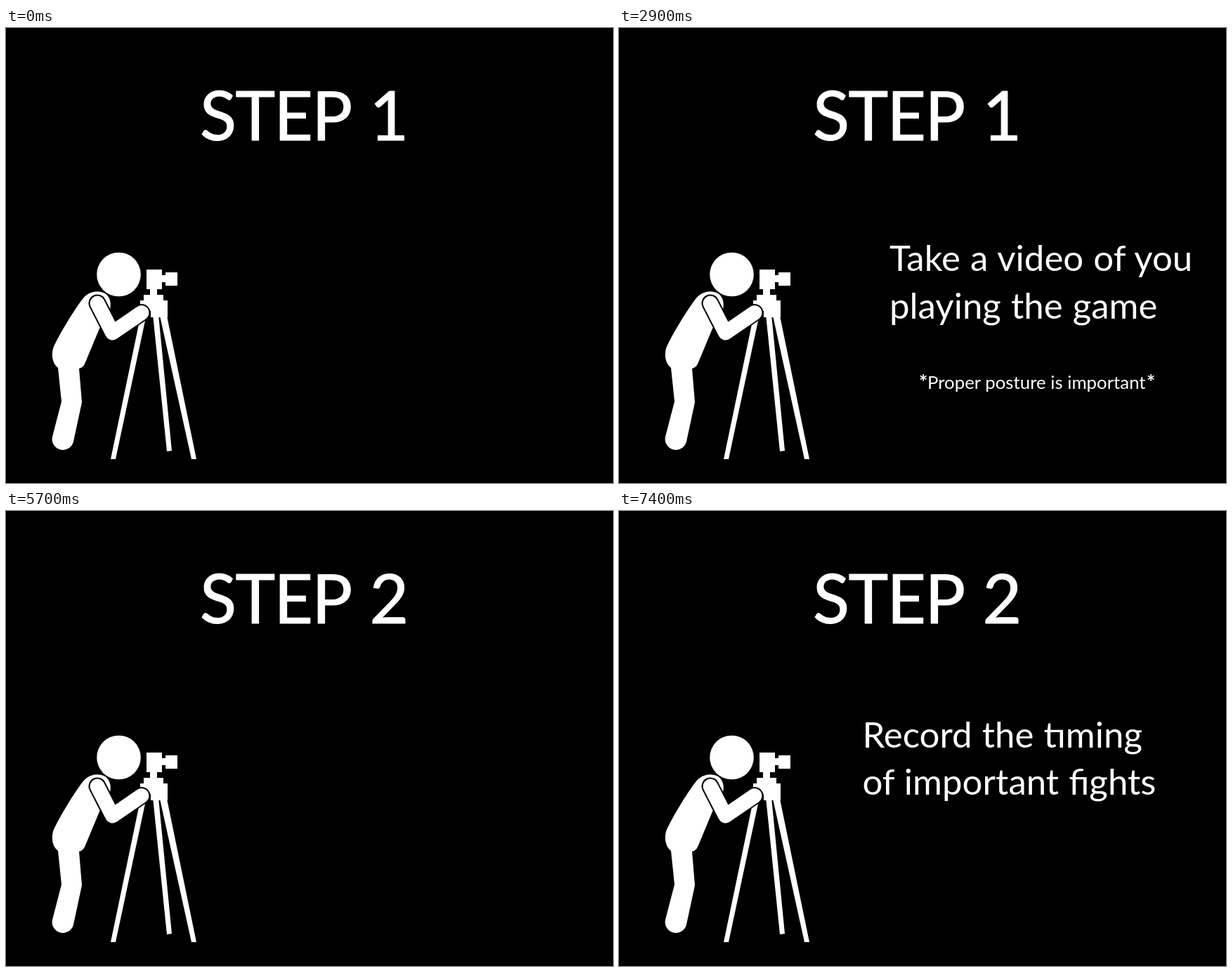
Write an HTML page that moves like this. It is 864 px wide and 648 px high and loops after 8000 ms.

```html
<!DOCTYPE html>
<html lang="en">
<head>
<meta charset="utf-8">
<title>Steps</title>
<style>
html, body { margin: 0; width: 100%; height: 100%; overflow: hidden; background: #000; }
svg { display: block; width: 100vw; height: 100vh; fill: #fff; font-family: Lato, sans-serif; }
.title { font-size: 96px; letter-spacing: -1.6px; stroke: #fff; stroke-width: 1.2px; stroke-linejoin: round; }
.body { font-size: 51px; word-spacing: 1px; }
.note { font-size: 25.8px; }
.star { font-size: 29px; font-weight: bold; }
</style>
</head>
<body>
<svg viewBox="0 0 864 648">
  <g id="tripod">
    <path d="M200 344H222V352H227V348H244V367H227V362H222V372H215V380H224V388H230V412H206V403H191V388H196V380H205V372H200Z"/>
    <path d="M190 417H198L156 614H149ZM209 408H217L236 602L229 603ZM219 410H229L271 614H264Z"/>
  </g>
  <g id="person">
    <circle cx="160.5" cy="351" r="31.3"/>
    <path d="M109 386C116 376 130 372 141 378C148 383 150 391 148 401L133 428L113 476Q110 484 104 485L108 533L96 589A15.3 15.3 0 0 1 66 582L79 532L74 484C67 479 64 468 67 456C76 436 96 403 109 386Z"/>
    <g fill="none" stroke-linecap="round" stroke-linejoin="round">
      <path d="M130 392L151.5 434L193 405.500" stroke="#000" stroke-width="25"/>
      <path d="M130 392L151.5 434L193 405.500" stroke="#fff" stroke-width="21"/>
    </g>
  </g>
  <text class="title" y="160"><tspan x="276">STEP</tspan> <tspan id="num" x="517.5">1</tspan></text>
  <g id="first">
    <text class="body"><tspan x="385" y="346">Take a video of you</tspan><tspan x="385" y="414">playing the game</tspan></text>
    <text class="note" y="514"><tspan class="star" x="427">*</tspan><tspan x="439">Proper posture is important</tspan><tspan class="star" x="751">*</tspan></text>
  </g>
  <g id="second">
    <text class="body"><tspan x="346.5" y="337">Record the tıming</tspan><tspan x="346.5" y="404">of important fights</tspan></text>
  </g>
</svg>
<script>
const $ = id => document.getElementById(id);
const show = (el, on) => el.setAttribute("visibility", on ? "visible" : "hidden");

function draw(t) {
  $("num").textContent = t < 4500 ? "1" : "2";
  show($("first"), t >= 500 && t < 4500);
  show($("second"), t >= 6500);
}

const start = performance.now();
function tick() {
  draw((performance.now() - start) % 8000);
  requestAnimationFrame(tick);
}
draw(0);
requestAnimationFrame(tick);
</script>
</body>
</html>
```
